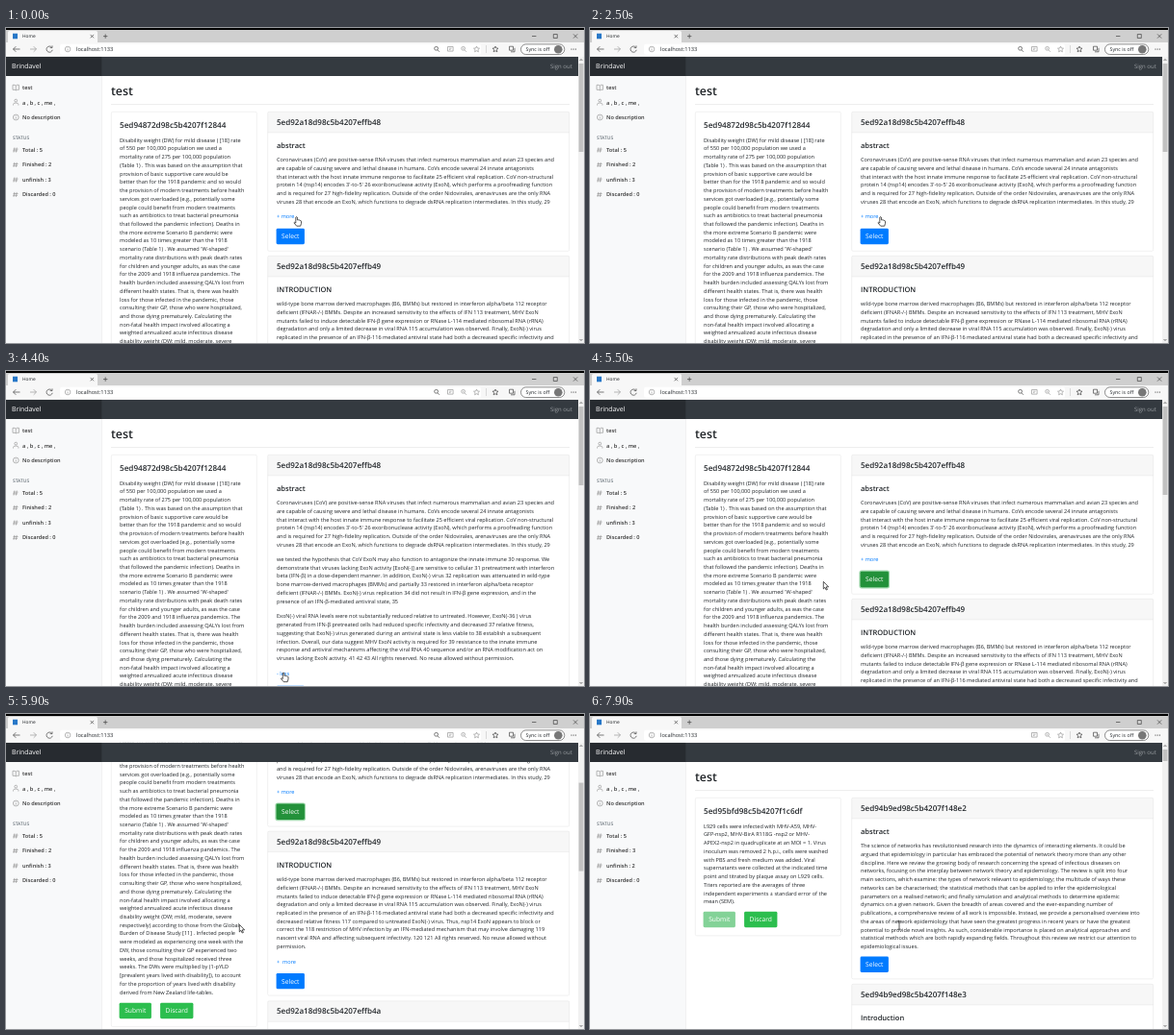
An HTML page that plays this animation: 600 px wide and 328 px high, repeating every 8 s.

```html
<!DOCTYPE html>
<html lang="en">
<head>
<meta charset="utf-8">
<title>Home</title>
<style>
html, body { margin: 0; width: 100%; height: 100%; overflow: hidden; background: #fff; }
svg { display: block; width: 600px; height: 328px; }
text { font-family: "Open Sans", sans-serif; text-rendering: geometricPrecision; white-space: pre; fill: #212529; }
.icon { fill: none; stroke: #444; stroke-width: .7; }
.thin { fill: none; stroke: #999; stroke-width: .7; }
.cursor { fill: #fff; stroke: #111; stroke-width: .7; stroke-linejoin: round; }
</style>
</head>
<body>
<svg id="stage" viewBox="0 0 600 328"></svg>
<script>
const LINE = 8.73, BODY = 5.58, LOOP = 8000, EXPAND = 119;

const disability = `Disability weight (DW) for mild disease ( [18] rate
of 550 per 100,000 population we used a
mortality rate of 275 per 100,000 population
(Table 1) . This was based on the assumption that
provision of basic supportive care would be
better than for the 1918 pandemic and so would
the provision of modern treatments before health
services got overloaded (e.g., potentially some
people could benefit from modern treatments
such as antibiotics to treat bacterial pneumonia
that followed the pandemic infection). Deaths in
the more extreme Scenario B pandemic were
modeled as 10 times greater than the 1918
scenario (Table 1) . We assumed 'W-shaped'
mortality rate distributions with peak death rates
for children and younger adults, as was the case
for the 2009 and 1918 influenza pandemics. The
health burden included assessing QALYs lost from
different health states. That is, there was health
loss for those infected in the pandemic, those
consulting their GP, those who were hospitalized,
and those dying prematurely. Calculating the
non-fatal health impact involved allocating a
weighted annualized acute infectious disease
disability weight (DW; mild, moderate, severe
respectively) according to those from the Global
Burden of Disease Study [11] . Infected people
were modeled as experiencing one week with the
DW, those consulting their GP experienced two
weeks, and those hospitalized received three
weeks. The DWs were multiplied by (1-pYLD
[prevalent years lived with disability]), to account
for the proportion of years lived with disability
derived from New Zealand life-tables.`;

const coronavirus = `Coronaviruses (CoV) are positive-sense RNA viruses that infect numerous mammalian and avian 23 species and
are capable of causing severe and lethal disease in humans. CoVs encode several 24 innate antagonists
that interact with the host innate immune response to facilitate 25 efficient viral replication. CoV non-structural
protein 14 (nsp14) encodes 3'-to-5' 26 exoribonuclease activity (ExoN), which performs a proofreading function
and is required for 27 high-fidelity replication. Outside of the order Nidovirales, arenaviruses are the only RNA
viruses 28 that encode an ExoN, which functions to degrade dsRNA replication intermediates. In this study, 29`;

const hypothesis = `we tested the hypothesis that CoV ExoN may also function to antagonize the innate immune 30 response. We
demonstrate that viruses lacking ExoN activity [ExoN(-)] are sensitive to cellular 31 pretreatment with interferon
beta (IFN-β) in a dose-dependent manner. In addition, ExoN(-) virus 32 replication was attenuated in wild-type
bone marrow-derived macrophages (BMMs) and partially 33 restored in interferon alpha/beta receptor
deficient (IFNAR-/-) BMMs. ExoN(-) virus replication 34 did not result in IFN-β gene expression, and in the
presence of an IFN-β-mediated antiviral state, 35`;

const levels = `ExoN(-) viral RNA levels were not substantially reduced relative to untreated. However, ExoN(-36 ) virus
generated from IFN-β pretreated cells had reduced specific infectivity and decreased 37 relative fitness,
suggesting that ExoN(-) virus generated during an antiviral state is less viable to 38 establish a subsequent
infection. Overall, our data suggest MHV ExoN activity is required for 39 resistance to the innate immune
response and antiviral mechanisms affecting the viral RNA 40 sequence and/or an RNA modification act on
viruses lacking ExoN activity. 41 42 43 All rights reserved. No reuse allowed without permission.`;

const macrophages = `wild-type bone marrow derived macrophages (B6, BMMs) but restored in interferon alpha/beta 112 receptor
deficient (IFNAR-/-) BMMs. Despite an increased sensitivity to the effects of IFN 113 treatment, MHV ExoN
mutants failed to induce detectable IFN-β gene expression or RNase L-114 mediated ribosomal RNA (rRNA)
degradation and only a limited decrease in viral RNA 115 accumulation was observed. Finally, ExoN(-) virus
replicated in the presence of an IFN-β-116 mediated antiviral state had both a decreased specific infectivity and
decreased relative fitness 117 compared to untreated ExoN(-) virus. Thus, nsp14 ExoN appears to block or
correct the 118 restriction of MHV infection by an IFN-mediated mechanism that may involve damaging 119
nascent viral RNA and affecting subsequent infectivity. 120 121 All rights reserved. No reuse allowed without
permission.`;

const cells = `L929 cells were infected with MHV-A59, MHV-
GFP-nsp2, MHV-BirA R118G -nsp2 or MHV-
APEX2-nsp2 in quadruplicate at an MOI = 1. Virus
inoculum was removed 2 h.p.i., cells were washed
with PBS and fresh medium was added. Viral
supernatants were collected at the indicated time
point and titrated by plaque assay on L929 cells.
Titers reported are the averages of three
independent experiments ± standard error of the
mean (SEM).`;

const networks = `The science of networks has revolutionised research into the dynamics of interacting elements. It could be
argued that epidemiology in particular has embraced the potential of network theory more than any other
discipline. Here we review the growing body of research concerning the spread of infectious diseases on
networks, focusing on the interplay between network theory and epidemiology. The review is split into four
main sections, which examine: the types of network relevant to epidemiology; the multitude of ways these
networks can be characterised; the statistical methods that can be applied to infer the epidemiological
parameters on a realised network; and finally simulation and analytical methods to determine epidemic
dynamics on a given network. Given the breadth of areas covered and the ever-expanding number of
publications, a comprehensive review of all work is impossible. Instead, we provide a personalised overview into
the areas of network epidemiology that have seen the greatest progress in recent years or have the greatest
potential to provide novel insights. As such, considerable importance is placed on analytical approaches and
statistical methods which are both rapidly expanding fields. Throughout this review we restrict our attention to
epidemiological issues.`;

// Markup helpers; every y of a text is its visual middle
const text = (x, y, size, str, attrs = '') =>
  `<text x="${x}" y="${y + size * .36}" font-size="${size}" ${attrs}>${str}</text>`;
const bold = (x, y, size, str) => text(x, y, size, str, 'font-weight="600"');
const para = (x, y, str) =>
  str.split('\n').map((line, i) => text(x, y + i * LINE, BODY, line)).join('');
const rect = (x, y, w, h, fill, attrs = '') =>
  `<rect x="${x}" y="${y}" width="${w}" height="${h}" fill="${fill}" ${attrs}/>`;
const path = (d, cls = 'icon', attrs = '') => `<path class="${cls}" d="${d}" ${attrs}/>`;
const group = (id, body, attrs = '') => `<g id="${id}" ${attrs}>${body}</g>`;
const frame = (x, y, w, h, attrs = '') =>
  rect(x, y, w, h, 'none', `rx="1.4" stroke="#e2e2e2" stroke-width=".5" ${attrs}`);
const button = (x, y, w, label, fill, id = '') =>
  rect(x - .4, y - 8.2, w + .8, 16.4, fill, `rx="1.4" id="${id}"`) +
  text(x + w / 2, y, 6.7, label, 'style="fill:#fff" text-anchor="middle"');
const link = (y, str, id = '') => text(281, y, BODY, str, `style="fill:#007bff" id="${id}"`);
const rightCard = (y, h, name, heading, attrs) =>
  rect(271.7, y, 313, 21.5, '#f7f7f7') + path(`M271.7 ${y + 21.5}h313`, 'thin', 'style="stroke:#e2e2e2;stroke-width:.5"') +
  frame(271.7, y, 313, h, attrs) + bold(281, y + 10.7, 8.05, name) + bold(281, y + 35, 7.5, heading);
const leftCard = (h, name, body, buttonY, submit, id) =>
  frame(109.3, 87.3, 151, h) + bold(118, 101.5, 8.15, name) + para(118, 116.7, body) +
  button(118, buttonY, 32.5, 'Submit', submit, id) + button(160.5, buttonY, 33.5, 'Discard', '#2cbe4e');
const heading = bold(109, 66, 12.4, 'test') + rect(109, 79.3, 476, .5, '#ddd');

const pageOne = heading +
  leftCard(353.5, '5ed94872d98c5b4207f12844', disability, 424.2, '#2cbe4e', 'submit') +
  rightCard(87.3, 145, '5ed92a18d98c5b4207effb48', 'abstract', 'id="firstCard"') +
  para(281, 137.2, coronavirus) +
  group('extra', para(281, 196, hypothesis) + para(281, 255.4, levels)) +
  group('below',
    link(196.3, '+ more', 'toggle') + button(281, 217, 28.5, 'Select', '#007bff', 'select') +
    rightCard(237.3, 171, '5ed92a18d98c5b4207effb49', 'INTRODUCTION') +
    para(281, 287.3, macrophages) + link(373, '+  more') + button(281, 393.3, 28.5, 'Select', '#007bff') +
    rightCard(414, 150, '5ed92a18d98c5b4207effb4a', 'RESULTS 123'));

const pageTwo = heading +
  leftCard(143.5, '5ed95bfd98c5b4207f1c6df', cells, 214, '#83d297') +
  rightCard(87.3, 188.5, '5ed94b9ed98c5b4207f148e2', 'abstract') +
  para(281, 137.2, networks) + button(281, 260.7, 28.5, 'Select', '#007bff') +
  rightCard(281.3, 150, '5ed94b9ed98c5b4207f148e3', 'Introduction');

const hash = y => path(`M8.8 ${y - 2.5}l-.8 5m3.2 -5l-.8 5m-2.9 -3.4h5m-5.4 1.8h5`, 'thin');
const side = (y, str, id = '') => text(17, y, 5.6, str, `font-weight="600" style="fill:#333" id="${id}"`);
const sidebar = rect(0, 50, 99.3, 278, '#f8f9fa') + rect(99.3, 50, .5, 278, '#e4e5e6') +
  path('M7 59.3h2.2l1 .8 1-.8h2.2v5h-2.2l-1 .7-1-.7H7zM10.2 60v5', 'thin') + side(62, 'test') +
  path('M7.5 80.5v-1q0-1.5 2.7-1.5t2.7 1.5v1M8.8 75.6a1.4 1.4 0 1 0 2.8 0a1.4 1.4 0 1 0-2.8 0', 'thin') +
  side(77.7, 'a , b , c , me ,') +
  path('M7.4 93a2.9 2.9 0 1 0 5.8 0a2.9 2.9 0 1 0-5.8 0M10.3 92.6v2m0-3.2v.6', 'thin') + side(93, 'No description') +
  text(7, 114, 4.9, 'STATUS', 'font-weight="600" style="fill:#6c757d"') +
  [127, 142.4, 158, 173.4].map(hash).join('') + side(127, 'Total : 5') +
  side(142.4, '', 'finished') + side(158, '', 'unfinish') + side(173.4, 'Discarded : 0');

const navbar = rect(0, 29.8, 594, 20.2, '#343a40') + rect(0, 29.8, 99.3, 20.2, '#272b30') +
  text(6, 40, 6.9, 'Brindavel', 'style="fill:#fff"') +
  text(565, 40, 6, 'Sign out', 'style="fill:#999da0"');

const lens = (x, y) => `M${x - 2.3} ${y - .7}a1.9 1.9 0 1 0 3.8 0a1.9 1.9 0 1 0-3.8 0M${x + 1} ${y + .8}l2 2`;
const star = (x, y) => `M${x} ${y - 3}l.9 2 2.1.2-1.6 1.5.5 2.1-1.9-1.1-1.9 1.1.5-2.1-1.6-1.5 2.1-.2z`;
const browser = rect(0, 0, 600, 15.5, '#cfcfcf') + rect(0, 0, 600, 2, '#000') +
  rect(2, 3, 93, 13, '#f7f7f7', 'rx="1.5"') + rect(0, 15, 600, 14.8, '#f7f7f7') +
  rect(7, 5.7, 5, 5.6, '#2878c8') + text(17, 8.6, 4.8, 'Home') +
  path('M87.6 6.9l3.4 3.4m0-3.4l-3.4 3.4M101 8.6h4.4m-2.2-2.2v4.4M546 8.5h4.4M568.3 6.5h4v4h-4zM589 6.4l4.2 4.2m0-4.2l-4.2 4.2') +
  rect(56, 16.8, 437, 11, '#fff', 'rx="2"') +
  path('M14.5 22h-7m2.8-2.8l-2.8 2.8 2.8 2.8') +
  path('M25 22h6.5m-2.8-2.8l2.8 2.8-2.8 2.8', 'thin') +
  path('M47.6 20.2a3.1 3.1 0 1 0 .6 2.6M48 18.4v2.2h-2.3') +
  path('M61.3 22a2.8 2.8 0 1 0 5.6 0a2.8 2.8 0 1 0-5.6 0M64.1 21.6v2m0-3.2v.6', 'thin') +
  text(73, 22, 5.7, 'localhost:1133') +
  path(lens(447, 22), 'icon', 'id="zoom"') +
  path('M458.5 19.5h5.6v4.6h-5.6zM460 21.2h2.5m-2.5 1.4h1.5', 'thin') + path(lens(475, 22) + 'M474 21.3h1.2', 'thin') +
  path(star(488.5, 22), 'thin') + rect(498, 18, .5, 8, '#bbb') + path(star(508, 22)) +
  path('M522.5 19.2h4v4h-4zM524 24.8h4v-4') +
  rect(534.5, 16.9, 45.3, 10.6, '#fff', 'rx="5.2" stroke="#444" stroke-width=".6"') +
  text(539.5, 22, 5.3, 'Sync is off') + '<circle cx="573.3" cy="22.2" r="4.3" fill="#777"/>' +
  [587, 589.2, 591.4].map(x => `<circle cx="${x}" cy="22" r=".5"/>`).join('');

const scrollbar = rect(594, 29.8, 6, 298.2, '#f1f1f1') +
  path('M595.6 34l1.4-1.5 1.4 1.5M595.6 324l1.4 1.5 1.4-1.5') + rect(594.6, 37, 4.8, 92, '#c1c1c1', 'id="thumb"');

const cursors =
  group('hand', path('M-.7 4.7V.6q.8-1 1.6 0v2.8q1-.5 1.5.2 1-.4 1.4.4 1-.2 1.2.7v2.2l-.8 2.8h-4L-2.6 6.3q.4-1.2 1.9.2z', 'cursor')) +
  group('beam', path('M-1.7-4.2h1.2l.5.5.5-.5h1.2M0-3.7v7.4M-1.7 4.2h1.2l.5-.5.5.5h1.2', 'icon', 'style="stroke:#111"')) +
  group('arrow', path('M0 0v7.6l1.7-1.6 1.2 2.7 1.2-.5-1.2-2.7h2.4z', 'cursor'));

stage.innerHTML = rect(0, 0, 600, 328, '#fff') + group('one', pageOne) + group('two', pageTwo) +
  sidebar + navbar + browser + scrollbar + group('cursor', cursors);

const $ = id => document.getElementById(id);
const show = (id, on) => $(id).style.display = on ? '' : 'none';
const set = (id, attrs) => Object.entries(attrs).forEach(([k, v]) => $(id).setAttribute(k, v));

// Pointer stops: time, x, y
const stops = [[0, 301.5, 196.5], [2600, 301.5, 196.5], [3300, 316, 277], [3700, 316, 277], [4300, 288, 314],
  [4500, 288, 314], [4900, 295, 216], [5100, 295, 216], [5400, 242.3, 219.3], [6000, 242.3, 219.3],
  [6600, 142, 306.5], [7100, 142, 306.5], [7800, 321, 220], [LOOP, 321, 220]];

function pointer(t) {
  const i = stops.findIndex(stop => stop[0] > t);
  const [t0, x0, y0] = stops[i - 1], [t1, x1, y1] = stops[i];
  const p = (t - t0) / (t1 - t0), ease = p * p * (3 - 2 * p);
  return [x0 + (x1 - x0) * ease, y0 + (y1 - y0) * ease];
}

function draw(t) {
  const open = t >= 2700 && t < 4500, done = t >= 7100, picked = t >= 5000;
  const left = 1 - Math.min(1, Math.max(0, (t - 5500) / 500));
  const scroll = 120 * (1 - left * left);
  show('one', !done);
  show('two', done);
  show('extra', open);
  show('zoom', !done);
  set('one', { transform: `translate(0 ${-scroll})` });
  set('below', { transform: `translate(0 ${open ? EXPAND : 0})` });
  set('firstCard', { height: open ? 145 + EXPAND : 145 });
  $('toggle').textContent = open ? '- less' : '+ more';
  set('select', { fill: picked ? '#23913a' : '#007bff', stroke: picked ? '#9fd8ac' : 'none',
    'stroke-width': 2.4, 'paint-order': 'stroke' });
  set('submit', { fill: t >= 6500 ? '#218838' : '#2cbe4e' });
  set('thumb', { y: done ? 37 : 37 + scroll * .3, height: done ? 12 : open ? 82 : 92 });
  $('finished').textContent = `Finished : ${done ? 3 : 2}`;
  $('unfinish').textContent = `unfinish : ${done ? 2 : 3}`;
  const shape = t < 2700 ? 'hand' : t < 4200 ? 'beam' : t < 5200 ? 'hand' : t < 6500 ? 'arrow' : t < 7200 ? 'hand' : 'beam';
  for (const id of ['hand', 'beam', 'arrow']) show(id, id === shape);
  set('cursor', { transform: `translate(${pointer(t)})` });
}

function tick() {
  draw(Math.floor(performance.now() % LOOP / 100) * 100);
  requestAnimationFrame(tick);
}
tick();
</script>
</body>
</html>
```
